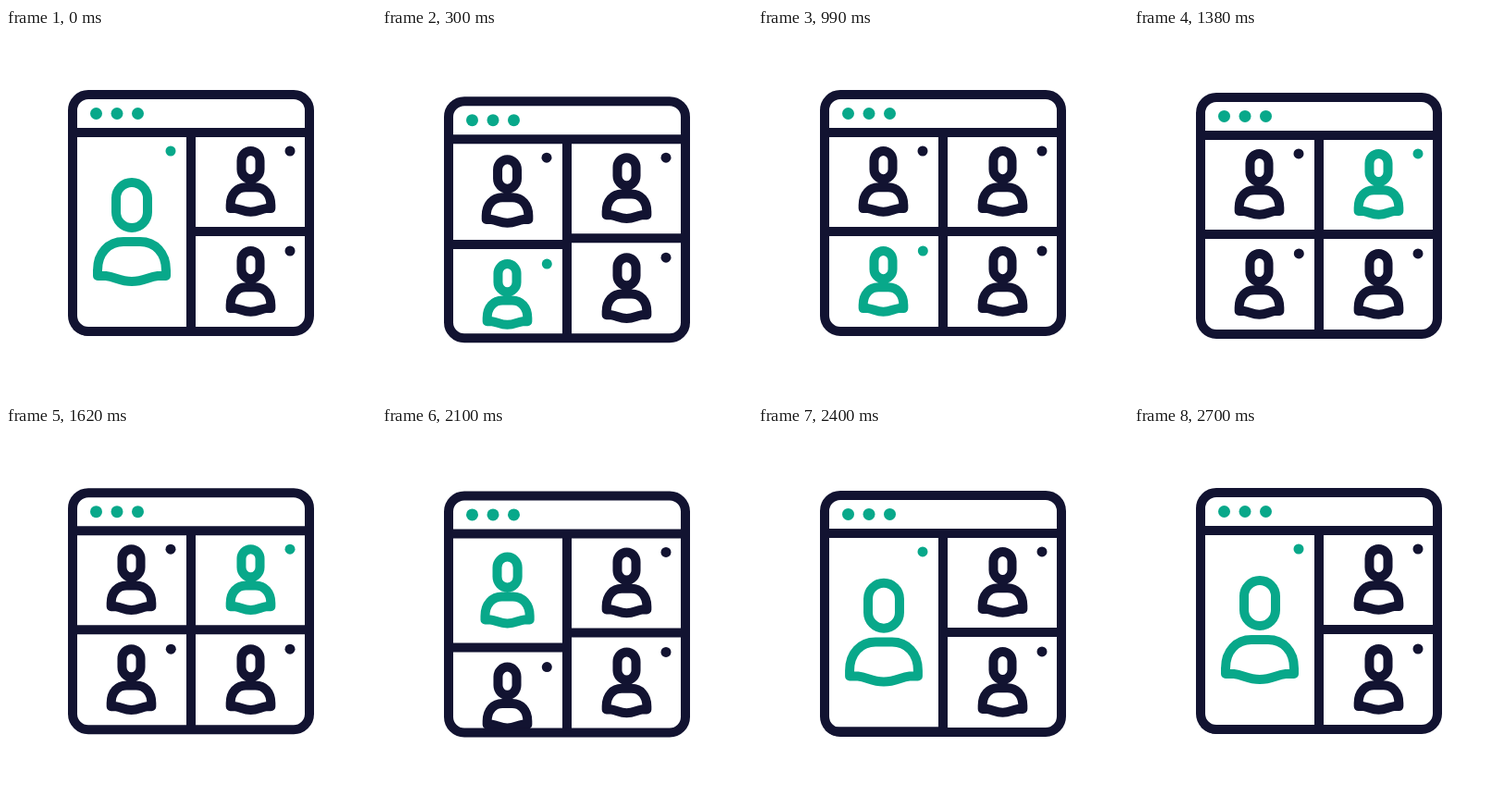
Recreate the animation shown at these times as an HTML page with a canvas. Size 400 by 400 pixels, loop 2.73 s.

```html
<!DOCTYPE html>
<html lang="en">
<head>
<meta charset="utf-8">
<title>Video call</title>
<style>
  html, body { margin: 0; width: 100%; height: 100%; overflow: hidden; background: #fff; }
  canvas { display: block; width: 400px; height: 400px; }
</style>
</head>
<body>
<canvas width="400" height="400"></canvas>
<script>
const ctx = document.querySelector('canvas').getContext('2d');
const DARK = '#121331', GREEN = '#08a88a';
const LOOP = 2730, STEP = 30;
const OPEN = 0, SWITCH = 1200, CLOSE = 2010, SLIDE = 431, ROW = 108;

// Cubic bezier easing with control points (a, 0) and (b, 1)
const bezier = (a, b) => u => {
  if (u <= 0) return 0;
  if (u >= 1) return 1;
  let lo = 0, hi = 1, s;
  for (let i = 0; i < 24; i++) {
    s = (lo + hi) / 2;
    const x = 3 * a * s * (1 - s) ** 2 + 3 * b * s * s * (1 - s) + s ** 3;
    if (x < u) lo = s; else hi = s;
  }
  return s * s * (3 - 2 * s);
};
const slide = bezier(.4, .2), rise = bezier(.6, .7), fall = bezier(.333, .1);
const mix = (a, b, p) => a + (b - a) * p;

// The window dips quickly and settles slowly
const dip = (t, height, pace = 1) => {
  const u = t / pace;
  return height * (u < 180 ? rise(u / 180) : 1 - fall((u - 180) / 510));
};

function dot(x, y, r, color) {
  ctx.fillStyle = color;
  ctx.beginPath();
  ctx.arc(x, y, r, 0, 7);
  ctx.fill();
}

function line(x1, y1, x2, y2) {
  ctx.strokeStyle = DARK;
  ctx.beginPath();
  ctx.moveTo(x1, y1);
  ctx.lineTo(x2, y2);
  ctx.stroke();
}

// Scales the outline but keeps the stroke width
function person(x, y, color, size = 0) {
  ctx.save();
  ctx.translate(x, y);
  ctx.scale(mix(.59, 1, size), mix(.615, 1, size));
  ctx.beginPath();
  ctx.roundRect(-17, 0, 34, 49, 17);
  ctx.moveTo(-37, 101);
  ctx.lineTo(-37, 95);
  ctx.bezierCurveTo(-37, 76, -25, 64, -9, 64);
  ctx.lineTo(9, 64);
  ctx.bezierCurveTo(25, 64, 37, 76, 37, 95);
  ctx.lineTo(37, 101);
  ctx.lineTo(28, 101);
  ctx.bezierCurveTo(18, 102, 13, 107, 0, 107);
  ctx.bezierCurveTo(-13, 107, -18, 102, -28, 101);
  ctx.closePath();
  ctx.restore();
  ctx.strokeStyle = color;
  ctx.stroke();
}

function windowPath(inset, r) {
  ctx.beginPath();
  ctx.roundRect(inset, inset, 400 - 2 * inset, 400 - 2 * inset, r);
}

function draw(t) {
  const within = (a, b) => t >= a && t < b;
  const tint = on => on ? GREEN : DARK;
  const big = t < CLOSE ? 1 - slide((t - OPEN) / SLIDE) : slide((t - CLOSE) / SLIDE);
  const shift = ROW * big;
  const offset = t < SWITCH ? dip(t - OPEN, 11)
    : t < CLOSE ? dip(t - SWITCH, 3, .8)
    : dip(t - CLOSE, 11);

  const topLeft = tint(!within(30, 2040));
  const lowLeft = tint(within(30, 1230));
  const topRight = tint(within(1230, 2040));

  ctx.fillStyle = '#fff';
  ctx.fillRect(0, 0, 400, 400);
  ctx.save();
  ctx.translate(0, offset);
  ctx.lineWidth = 10;
  ctx.lineJoin = 'round';

  ctx.save();
  windowPath(67, 22);
  ctx.clip();
  person(mix(135.5, 136, big), mix(133, 167, big), topLeft, big);
  person(135.5, 133 + ROW + shift, lowLeft);
  person(264.5, 133, topRight);
  person(264.5, 133 + ROW, DARK);
  if (!within(2040, 2190)) dot(178, 133, 5.5, topLeft);
  if (!within(840, 990)) dot(178.3, 241 + shift, 5.5, lowLeft);
  if (!within(1890, 2040)) dot(307, 133, 5.5, topRight);
  dot(307, 241, 5.5, DARK);
  line(72, 220 + shift, 200, 220 + shift);
  line(200, 220, 328, 220);
  line(200, 113, 200, 328);
  line(72, 113, 328, 113);
  ctx.restore();

  windowPath(72, 17);
  ctx.strokeStyle = DARK;
  ctx.stroke();
  for (const x of [97.5, 120, 142.5]) dot(x, 92.5, 6.5, GREEN);
  ctx.restore();
}

const start = performance.now();
function frame() {
  const t = (performance.now() - start) % LOOP;
  draw(Math.floor(t / STEP) * STEP);
  requestAnimationFrame(frame);
}
frame();
</script>
</body>
</html>
```
